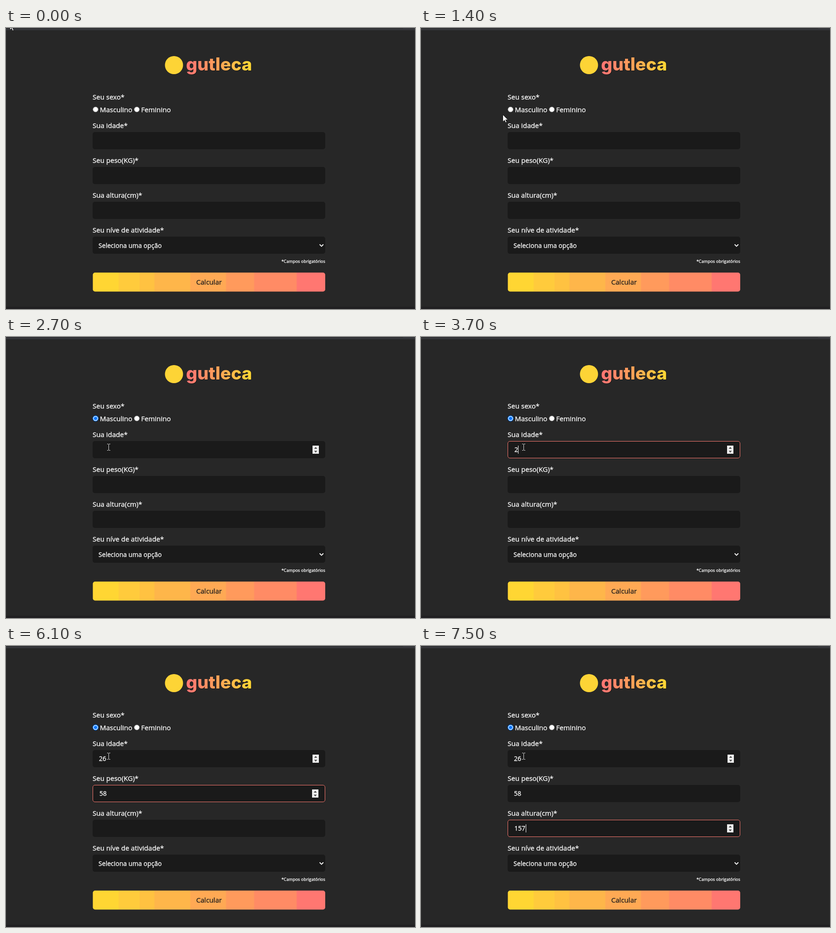
These frames come from a looping animation (902 px wide and 621 px high, 8000 ms). An HTML page:

```html
<!DOCTYPE html>
<html lang="pt">
<head>
<meta charset="utf-8">
<title>Calculadora</title>
<style>
  html, body { margin: 0; width: 100%; height: 100%; overflow: hidden; background: #272727; }
  svg { display: block; width: 902px; height: 621px; }
  text { font: 15.1px "Open Sans", sans-serif; fill: #fff; stroke: #fff; stroke-width: .3; white-space: pre; }
  .value { font-size: 14.1px; }
  .note { font-size: 9.4px; text-anchor: end; }
  .action { text-anchor: middle; fill: #1c1c1c; stroke: #1c1c1c; }
  .brand { font: 800 39px Inter, sans-serif; stroke: none; }
  .box { fill: #1a1a1a; }
</style>
</head>
<body>
<svg id="stage" viewBox="0 0 902 621">
  <defs>
    <linearGradient id="bands"></linearGradient>
    <linearGradient id="brandFill" gradientUnits="userSpaceOnUse" x1="405" x2="540" y1="0" y2="0">
      <stop offset="0" stop-color="#ff7772"/>
      <stop offset=".5" stop-color="#ffa655"/>
      <stop offset="1" stop-color="#ffd735"/>
    </linearGradient>
    <g id="spinner">
      <rect width="14" height="18" fill="#efefef"/>
      <path d="M3.6 7 7 3 10.4 7ZM3.6 11.5 7 15.5 10.4 11.5Z" fill="#4a4a4a"/>
    </g>
  </defs>
  <rect width="902" height="621" fill="#272727"/>
  <rect width="902" height="5" fill="#35363a"/>
  <rect width="876" height="1" fill="#27282b"/>
  <rect y="616" width="902" height="5" fill="#201f21"/>

  <circle cx="370.5" cy="82" r="20" fill="#fdd436"/>
  <text class="brand" x="398" y="95" style="fill:#161616">gutleca</text>
  <text class="brand" x="397" y="94" style="fill:url(#brandFill)">gutleca</text>

  <text x="191" y="158">Seu sexo*</text>
  <circle id="male" cx="197.5" cy="180" r="5.8" fill="#fff" stroke="#767676"/>
  <circle id="maleDot" cx="197.5" cy="180" r="3.8"/>
  <text x="207" y="186">Masculino</text>
  <circle cx="288.5" cy="180" r="5.8" fill="#fff" stroke="#767676"/>
  <text x="298" y="186">Feminino</text>

  <g id="fields"></g>

  <text x="191" y="452">Seu níve de atividade*</text>
  <rect class="box" x="191" y="461" width="513" height="38" rx="5"/>
  <text class="value" x="204" y="486">Seleciona uma opção</text>
  <path d="M691.7 478.3 695.8 482.4 699.9 478.3" fill="none" stroke="#fff" stroke-width="2"/>
  <text class="note" x="704" y="519">*Campos obrigatórios</text>
  <rect x="191.5" y="540.5" width="512.5" height="42" rx="5" fill="url(#bands)"/>
  <text class="action" x="447.7" y="567">Calcular</text>

  <path id="arrow" d="M.5.5V16.2L4.2 12.8 6.6 18.2 9 17.1 6.7 11.9H11.7Z"
        fill="#fff" stroke="#111" stroke-width=".9"/>
  <path id="beam" d="M-3.5-7H-.7M.7-7H3.5M0-6.5V6.5M-3.5 7H-.7M.7 7H3.5"
        fill="none" stroke="#e4e4e4"/>
</svg>
<script>
const LOOP = 8000;
const $ = id => document.getElementById(id);

function add(parent, tag, attrs, content = '') {
  const node = document.createElementNS('http://www.w3.org/2000/svg', tag);
  for (const key in attrs) node.setAttribute(key, attrs[key]);
  node.textContent = content;
  parent.append(node);
  return node;
}
const show = (node, on) => node.setAttribute('visibility', on ? 'visible' : 'hidden');
const move = (node, x, y) => node.setAttribute('transform', `translate(${x} ${y})`);
const latest = (steps, t) => steps.filter(step => step[0] <= t).pop();

// Button colour bands: colour and right edge
const bands = [['#ffd633', 57], ['#ffcb3c', 103], ['#ffc241', 136], ['#feb64a', 215],
  ['#ffa954', 294], ['#ff9a5c', 356], ['#ff8b65', 450], ['#ff7771', 513]];
let bandStart = 0;
for (const [color, edge] of bands) {
  for (const x of [bandStart + 1, edge - 1])
    add($('bands'), 'stop', { offset: x / 513, 'stop-color': color });
  bandStart = edge;
}

// keys: time and the value after it; the first entry is the moment of focus
const fields = [
  { label: 'Sua idade*', y: 230, blur: 4300, hover: 2400,
    keys: [[2800, ''], [3700, '2'], [3900, '26']] },
  { label: 'Seu peso(KG)*', y: 307, blur: 6300, hover: LOOP,
    keys: [[4300, ''], [5400, '5'], [5600, '58']] },
  { label: 'Sua altura(cm)*', y: 384, blur: LOOP, hover: LOOP,
    keys: [[6300, ''], [7000, '1'], [7300, '15'], [7500, '157']] }
];
for (const f of fields) {
  const g = $('fields');
  add(g, 'text', { x: 191, y: f.y - 9 }, f.label);
  add(g, 'rect', { class: 'box', x: 191, y: f.y, width: 513, height: 38, rx: 5 });
  f.border = add(g, 'rect', { x: 191.5, y: f.y + .5, width: 512, height: 37, rx: 4.5,
    fill: 'none', stroke: '#ff7a70' });
  f.text = add(g, 'text', { class: 'value', y: f.y + 24 });
  f.caret = add(g, 'rect', { y: f.y + 10, width: 1, height: 18, fill: '#fff' });
  f.spinner = add(g, 'use', { href: '#spinner' });
}

function drawField(f, t) {
  const focused = t >= f.keys[0][0] && t < f.blur;
  const [since, value] = latest(f.keys, t) || [0, ''];
  show(f.border, focused);
  show(f.spinner, focused || t >= f.hover);
  move(f.spinner, focused ? 675 : 676, f.y + 10);
  f.text.textContent = value;
  f.text.setAttribute('x', focused ? 206 : 205);
  f.caret.setAttribute('x', Math.round(206 + value.length * 8.24));
  show(f.caret, focused && (t - since) % 1000 < 500);
}

// Pointer stops: time, x, y
const pointer = [[0, 8, -12], [100, 210, 250], [200, 461, 549], [300, 300, 410], [400, 122, 237]];
for (let i = 0; i < 8; i++) {
  const u = i / 7, ease = u * u * (3 - 2 * u);
  pointer.push([900 + i * 100, Math.round(129 + 64 * ease), Math.round(236 - 56 * ease)]);
}
pointer.push([2300, 201, 194], [2400, 217.5, 219.5], [2600, 224.5, 234.5], [2700, 226.5, 243.5]);

function drawRadio(t) {
  const checked = t >= 2000;
  const over = t >= 1500 && t < 2300;
  const blue = over ? '#005cc8' : '#0075ff';
  const grey = t >= 1900 ? '#8d8d8d' : over ? '#4f4f4f' : '#767676';
  $('male').setAttribute('stroke', checked ? blue : grey);
  $('male').setAttribute('stroke-width', checked ? 1.3 : 1);
  $('maleDot').setAttribute('fill', blue);
  show($('maleDot'), checked);
}

function draw(t) {
  const [, x, y] = latest(pointer, t);
  const typing = t >= 2400;
  show($('arrow'), !typing);
  show($('beam'), typing);
  move(typing ? $('beam') : $('arrow'), x, y);
  drawRadio(t);
  fields.forEach(f => drawField(f, t));
}

const start = performance.now();
function tick(now) {
  draw(Math.max(0, now - start) % LOOP);
  requestAnimationFrame(tick);
}
draw(0);
requestAnimationFrame(tick);
</script>
</body>
</html>
```
